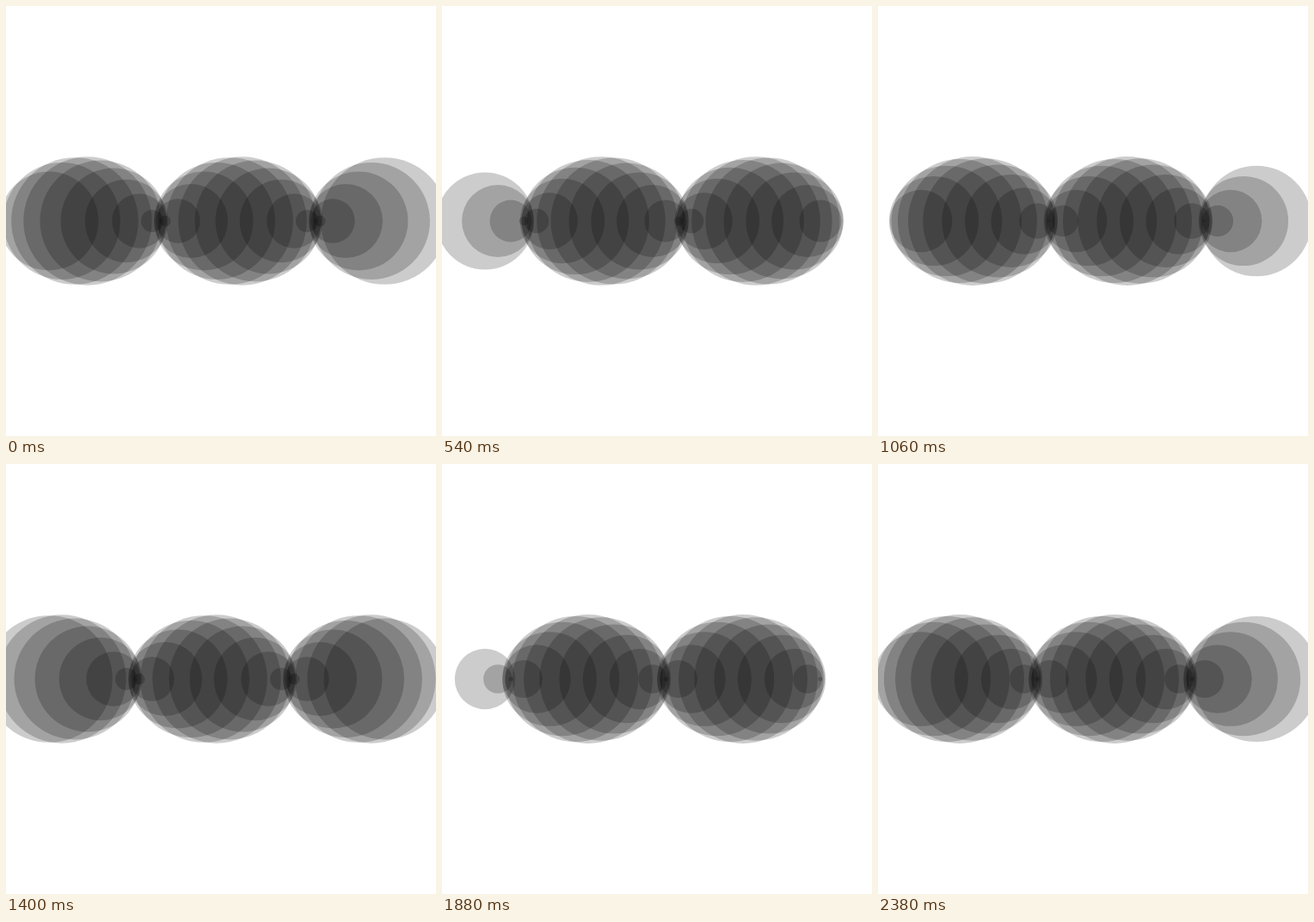
These frames come from a looping animation (500 px wide and 500 px high, 2400 ms). An HTML page with a canvas:

```html
<!DOCTYPE html>
<html lang="en">
<head>
<meta charset="utf-8">
<title>Pulsing circles</title>
<style>
  html, body { margin: 0; width: 100%; height: 100%; overflow: hidden; background: #fff; }
  canvas { display: block; width: 500px; height: 500px; }
</style>
</head>
<body>
<canvas id="stage" width="500" height="500"></canvas>
<script>
  const ctx = document.getElementById('stage').getContext('2d');
  const LOOP = 2400, STEP = 20;
  const COUNT = 27, FIRST_X = 50, GAP = 15, MID_Y = 250, MAX_RADIUS = 75;
  const DEGREE = Math.PI / 180;

  function draw(time) {
    // The wave travels left by 3 degrees (3 px) per step.
    const shift = Math.floor((time % LOOP) / STEP) * 3;
    ctx.fillStyle = '#fff';
    ctx.fillRect(0, 0, 500, 500);
    ctx.fillStyle = 'rgba(0, 0, 0, 0.2)';
    for (let i = 0; i < COUNT; i++) {
      const x = FIRST_X + i * GAP;
      const radius = MAX_RADIUS * Math.abs(Math.sin((x + shift) * DEGREE));
      ctx.beginPath();
      ctx.arc(x, MID_Y, radius, 0, Math.PI * 2);
      ctx.fill();
    }
  }

  function tick() {
    draw(performance.now());
    requestAnimationFrame(tick);
  }
  tick();
</script>
</body>
</html>
```
